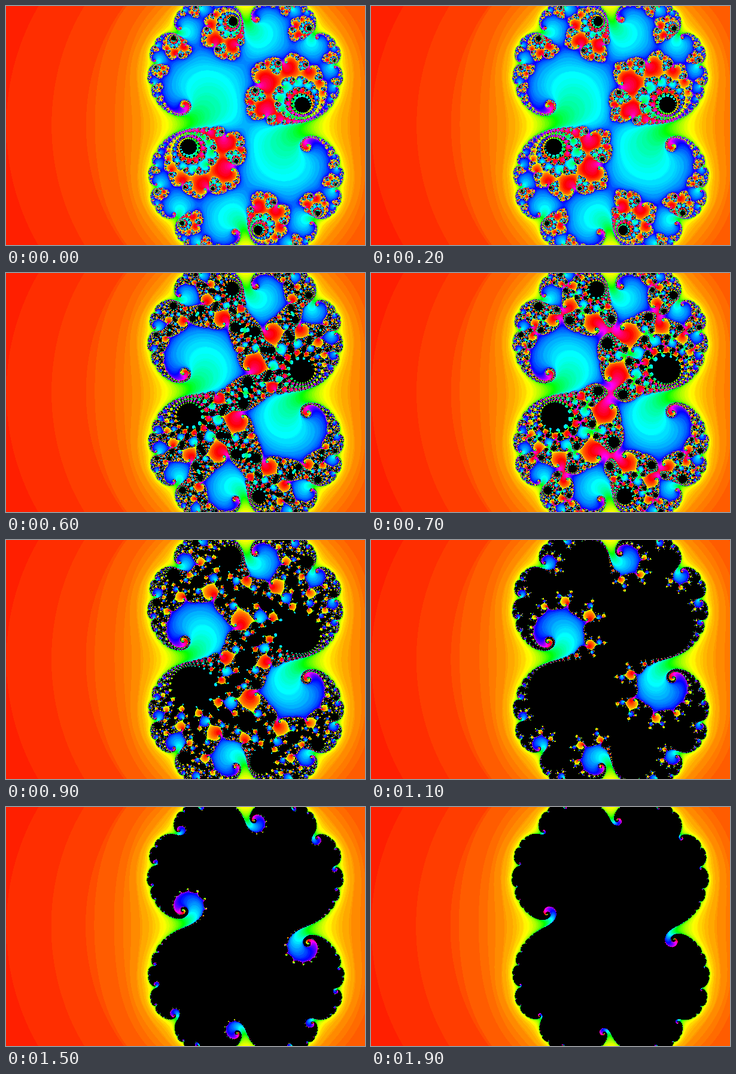
Recreate the animation shown at these times as an HTML page with a canvas. Size 600 by 400 pixels, loop 2 s.

```html
<!DOCTYPE html>
<html lang="en">
<head>
<meta charset="utf-8">
<title>Julia set</title>
<style>
  html, body { margin: 0; width: 100%; height: 100%; overflow: hidden; background: #000; }
  canvas { display: block; width: 600px; height: 400px; }
</style>
</head>
<body>
<canvas id="stage" width="600" height="400"></canvas>
<script>
const WIDTH = 600, HEIGHT = 400, SCALE = 200;
const MAX_ITER = 100;
const STEPS = 20, STEP_MS = 100;
const C_RE = 0.27795, C_IM = -0.00695, C_ACCEL = -0.000047;
const BLACK = 0xff000000;

const ctx = document.getElementById('stage').getContext('2d');
const cache = [];

// Fully saturated hue (in turns) as a little-endian RGBA word.
function hueColor(turn) {
  const channel = shift => {
    const k = (shift + turn * 6) % 6;
    return Math.round(255 * (1 - Math.max(0, Math.min(k, 4 - k, 1))));
  };
  return (BLACK | channel(1) << 16 | channel(3) << 8 | channel(5)) >>> 0;
}

const palette = Array.from({ length: 256 }, (_, i) => hueColor((i % 100) / 100));

function escapeColor(x, y, cRe, cIm) {
  let n = 0, xx = x * x, yy = y * y;
  while (xx + yy <= 4 && n < MAX_ITER) {
    y = 2 * x * y + cIm;
    x = xx - yy + cRe;
    xx = x * x;
    yy = y * y;
    n++;
  }
  if (n === MAX_ITER) return BLACK;
  const smooth = n + 1 - Math.log(Math.log2(xx + yy) / 2);
  return palette[Math.floor(255 * smooth / MAX_ITER)];
}

function render(step) {
  const image = ctx.createImageData(WIDTH, HEIGHT);
  const pixels = new Uint32Array(image.data.buffer);
  const cRe = C_RE + C_ACCEL * step * step;
  for (let py = 0; py < HEIGHT; py++) {
    for (let px = 0; px < WIDTH; px++) {
      // The set is point-symmetric, so the right part repeats pixels already drawn.
      const mirrored = py > HEIGHT / 2 && px > 200;
      pixels[py * WIDTH + px] = mirrored
        ? pixels[(HEIGHT - py) * WIDTH + 800 - px]
        : escapeColor(px / SCALE - 2, py / SCALE - 1, cRe, C_IM);
    }
  }
  return image;
}

let shown = -1;
function tick() {
  const step = Math.floor(performance.now() / STEP_MS) % STEPS;
  if (step !== shown) {
    cache[step] = cache[step] || render(step);
    ctx.putImageData(cache[step], 0, 0);
    shown = step;
  }
  requestAnimationFrame(tick);
}
tick();
</script>
</body>
</html>
```
